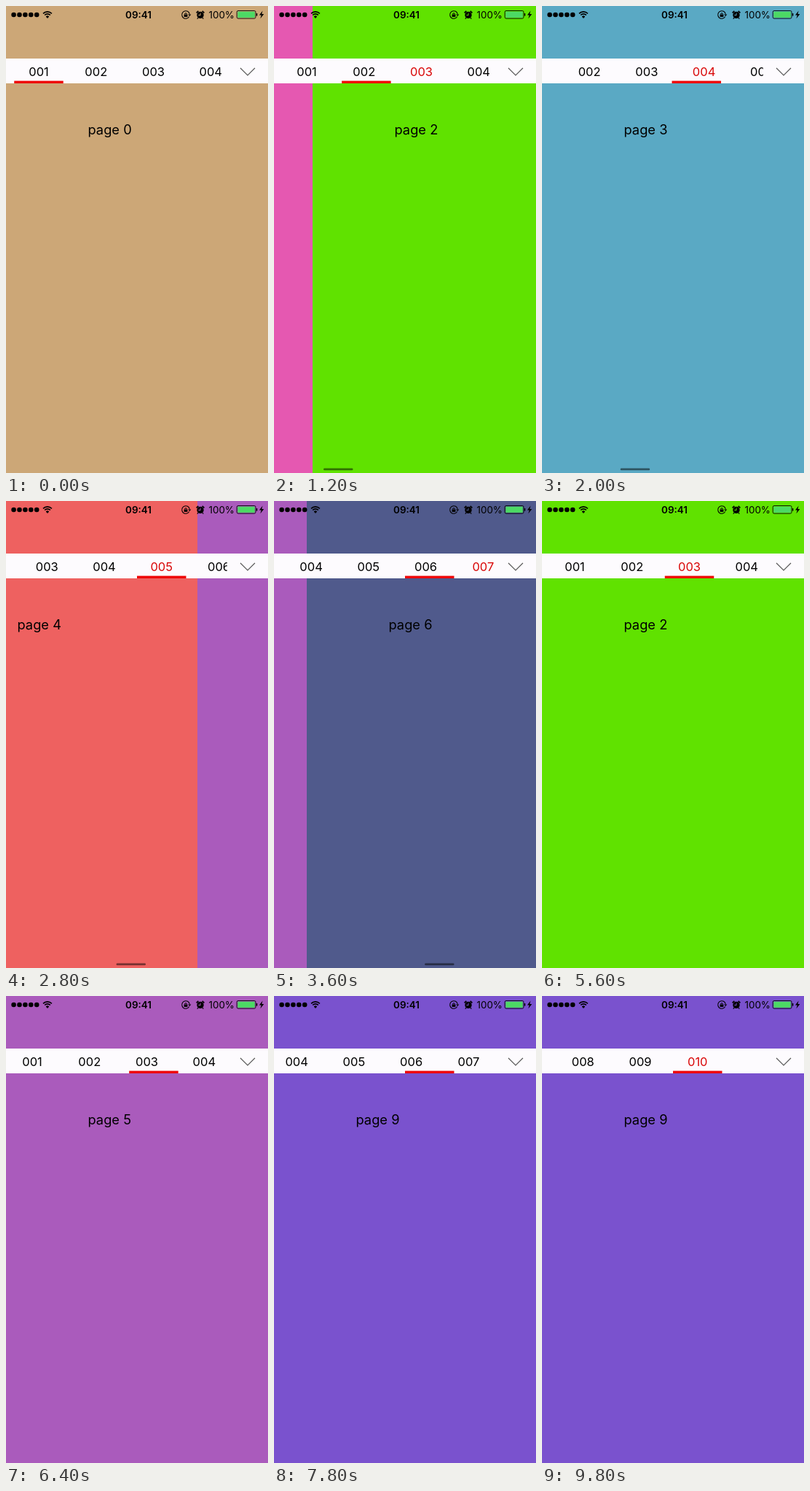
These frames come from a looping animation (360 px wide and 640 px high, 10000 ms). An HTML page with a canvas:

```html
<!DOCTYPE html>
<html lang="en">
<head>
<meta charset="utf-8">
<title>Paged tabs</title>
<style>
  html, body { margin: 0; width: 100%; height: 100%; overflow: hidden; }
  canvas { display: block; width: 360px; height: 640px; }
</style>
</head>
<body>
<canvas id="stage" width="360" height="640"></canvas>
<script>
const ctx = document.getElementById('stage').getContext('2d');
const W = 360, H = 640, LOOP = 10000, STEP = 200;
const FONT = 'Inter, Roboto, sans-serif';
const BLACK = '#000', RED = '#d90808', LINE = '#ee0404', PAPER = '#fdfbfe';
const PAGES = ['#cca777', '#e558b1', '#60e200', '#5aa9c4', '#ee6160',
               '#aa5bbc', '#505a8c', '#c98a4b', '#4fb08a', '#7a52ce'];

const BAR_TOP = 72, BAR_BOTTOM = 106, TAB_PITCH = 78.75, TABS_WIDTH = 303.75;
const SWIPE = 500, SETTLE = 343, TAB_ANIM = 300, MENU_ANIM = 300;

// Swipe n moves from page n to page n + 1.
const swipes = [220, 821, 1425, 2025, 2630, 3210];
const menus = [
  { open: 4050, tap: 4960, pick: 2 },
  { open: 5700, tap: 6364, pick: 5 },
  { open: 7050, tap: 7748, pick: 9 }
];
const selections = [
  ...swipes.map((at, n) => ({ at: at + SETTLE, index: n + 1 })),
  ...menus.map(m => ({ at: m.tap, index: m.pick }))
];

const clamp = v => Math.min(1, Math.max(0, v));
const mix = (a, b, p) => a + (b - a) * p;
const ease = v => { const u = clamp(v); return u * u * (3 - 2 * u); };
const tabX = i => 45 + TAB_PITCH * i;
const tabScroll = i => Math.max(0, TAB_PITCH * i - 168.75);
const label = i => String(i + 1).padStart(3, '0');

function stateAt(t) {
  const s = { selected: 0, scroll: 0, line: tabX(0), page: 0, menu: 0 };
  for (const { at, index } of selections) {
    if (t < at) break;
    const p = ease((t - at) / TAB_ANIM);
    s.scroll = mix(tabScroll(s.selected), tabScroll(index), p);
    s.line = mix(tabX(s.selected), tabX(index), p);
    s.selected = index;
  }
  for (const at of swipes) s.page += ease((t - at) / SWIPE);
  for (const m of menus) {
    if (t >= m.tap) s.page = m.pick;
    else if (t >= m.open) s.menu = ease((t - m.open) / MENU_ANIM);
  }
  const end = swipes[swipes.length - 1] + SWIPE;
  s.indicator = t < swipes[0] ? 0 : 1 - clamp((t - end) / 250);
  return s;
}

function rect(x, y, w, h, color) {
  ctx.fillStyle = color;
  ctx.fillRect(x, y, w, h);
}

function text(str, x, y, size, color = BLACK, align = 'center', weight = 400) {
  ctx.font = `${weight} ${size}px ${FONT}`;
  ctx.textAlign = align;
  ctx.fillStyle = color;
  ctx.fillText(str, x, y);
}

function polyline(points, width, color) {
  ctx.beginPath();
  points.forEach(([x, y]) => ctx.lineTo(x, y));
  ctx.lineWidth = width;
  ctx.strokeStyle = color;
  ctx.stroke();
}

function polygon(points) {
  ctx.beginPath();
  points.forEach(([x, y]) => ctx.lineTo(x, y));
  ctx.fill();
}

function arc(x, y, r, from, to, width) {
  ctx.beginPath();
  ctx.arc(x, y, r, from, to);
  ctx.lineWidth = width;
  ctx.strokeStyle = BLACK;
  ctx.stroke();
}

function disc(x, y, r) {
  ctx.beginPath();
  ctx.arc(x, y, r, 0, Math.PI * 2);
  ctx.fill();
}

function drawPages(s) {
  const first = Math.floor(s.page);
  for (let i = first; i <= Math.min(first + 1, 9); i++) {
    const x = Math.round((i - s.page) * W);
    rect(x, 0, W, H, PAGES[i]);
    text('page ' + i, x + 112.5, 176, 18.3, BLACK, 'left');
  }
  if (s.indicator > 0) {
    ctx.fillStyle = `rgba(0,0,0,${0.5 * s.indicator})`;
    ctx.beginPath();
    ctx.roundRect(4 + s.page * W * 0.096, 633.5, 40.5, 2.8, 1.4);
    ctx.fill();
  }
}

function drawTabs(s, open) {
  rect(0, BAR_TOP, W, BAR_BOTTOM - BAR_TOP, PAPER);
  ctx.save();
  ctx.beginPath();
  ctx.rect(0, BAR_TOP, TABS_WIDTH, BAR_BOTTOM - BAR_TOP);
  ctx.clip();
  for (let i = 0; i < 10; i++) {
    const color = i > 0 && i === s.selected ? RED : BLACK;
    text(label(i), tabX(i) - s.scroll, 95.5, 16.5, color);
  }
  rect(s.line - s.scroll - 33.75, 102.6, 67.5, 3.4, LINE);
  ctx.restore();
  const [edge, tip] = open ? [95, 85] : [85, 95];
  polyline([[322, edge], [332, tip], [342, edge]], 1.1, '#555');
}

function drawMenu(s) {
  rect(0, 0, W, H, `rgba(70,70,70,${0.6 * s.menu})`);
  ctx.save();
  ctx.beginPath();
  ctx.rect(0, BAR_BOTTOM, W, H);
  ctx.clip();
  ctx.translate(0, BAR_BOTTOM - 225 * (1 - s.menu));
  rect(0, 0, W, 225, '#ff0');
  for (let i = 0; i < 10; i++) {
    const x = 11.25 + (i % 4) * 87.4, y = Math.floor(i / 4) * 56.25;
    rect(x, y, 75.9, 45, PAPER);
    text(label(i), x + 38, y + 30, 19.4, i === s.selected ? RED : BLACK);
  }
  ctx.restore();
}

function drawLockIcon(x, y) {
  arc(x, y, 5.3, 0.5, Math.PI * 2 - 0.15, 1.1);
  ctx.fillStyle = BLACK;
  polygon([[x + 3.2, y - 0.6], [x + 7.3, y - 0.6], [x + 5.3, y + 2]]);
  rect(x - 2.4, y - 0.5, 4.8, 3.4, BLACK);
  arc(x, y - 0.7, 1.5, Math.PI, Math.PI * 2, 1);
}

function drawAlarmIcon(x, y) {
  ctx.fillStyle = BLACK;
  ctx.beginPath();
  ctx.arc(x, y + 0.4, 4.7, 0, Math.PI * 2);
  ctx.rect(x - 0.4, y - 2.6, 0.9, 3.5);
  ctx.rect(x - 2.6, y + 0.1, 2.2, 0.8);
  ctx.fill('evenodd');
  for (const side of [-1, 1]) {
    polyline([[x + side * 5.4, y - 2.6], [x + side * 2.6, y - 5]], 1.7, BLACK);
    polyline([[x + side * 3, y + 4], [x + side * 4.2, y + 5.6]], 1.2, BLACK);
  }
}

function drawBattery() {
  ctx.lineWidth = 0.9;
  ctx.strokeStyle = BLACK;
  ctx.beginPath();
  ctx.roundRect(317.2, 6.5, 25.8, 10.6, 1.8);
  ctx.stroke();
  rect(318.4, 7.7, 23.4, 8.2, '#4cd964');
  rect(343.9, 10, 1.4, 3.6, BLACK);
  ctx.fillStyle = BLACK;
  polygon([[352.6, 6.6], [348, 12.6], [350.8, 12.6],
           [349.4, 17.2], [354.4, 10.9], [351.4, 10.9]]);
}

function drawStatus() {
  ctx.fillStyle = BLACK;
  for (let i = 0; i < 5; i++) disc(10.6 + i * 7.9, 12, 3.3);
  const up = -Math.PI / 2, spread = 0.8;
  arc(57, 16.2, 8.3, up - spread, up + spread, 1.7);
  arc(57, 16.2, 5.3, up - spread, up + spread, 1.7);
  ctx.fillStyle = BLACK;
  ctx.beginPath();
  ctx.moveTo(57, 17);
  ctx.arc(57, 16.6, 3.1, up - spread, up + spread);
  ctx.fill();
  text('09:41', 182, 16.7, 13.4, BLACK, 'center', 600);
  drawLockIcon(247, 12);
  drawAlarmIcon(267, 12);
  text('100%', 314, 16.7, 13.4, BLACK, 'right');
  drawBattery();
}

function frame(now) {
  // The screen refreshes five times a second.
  const t = Math.floor((now % LOOP) / STEP) * STEP;
  const s = stateAt(t);
  ctx.clearRect(0, 0, W, H);
  drawPages(s);
  drawTabs(s, s.menu > 0);
  if (s.menu > 0) drawMenu(s);
  drawStatus();
  requestAnimationFrame(frame);
}

frame(0);
</script>
</body>
</html>
```
